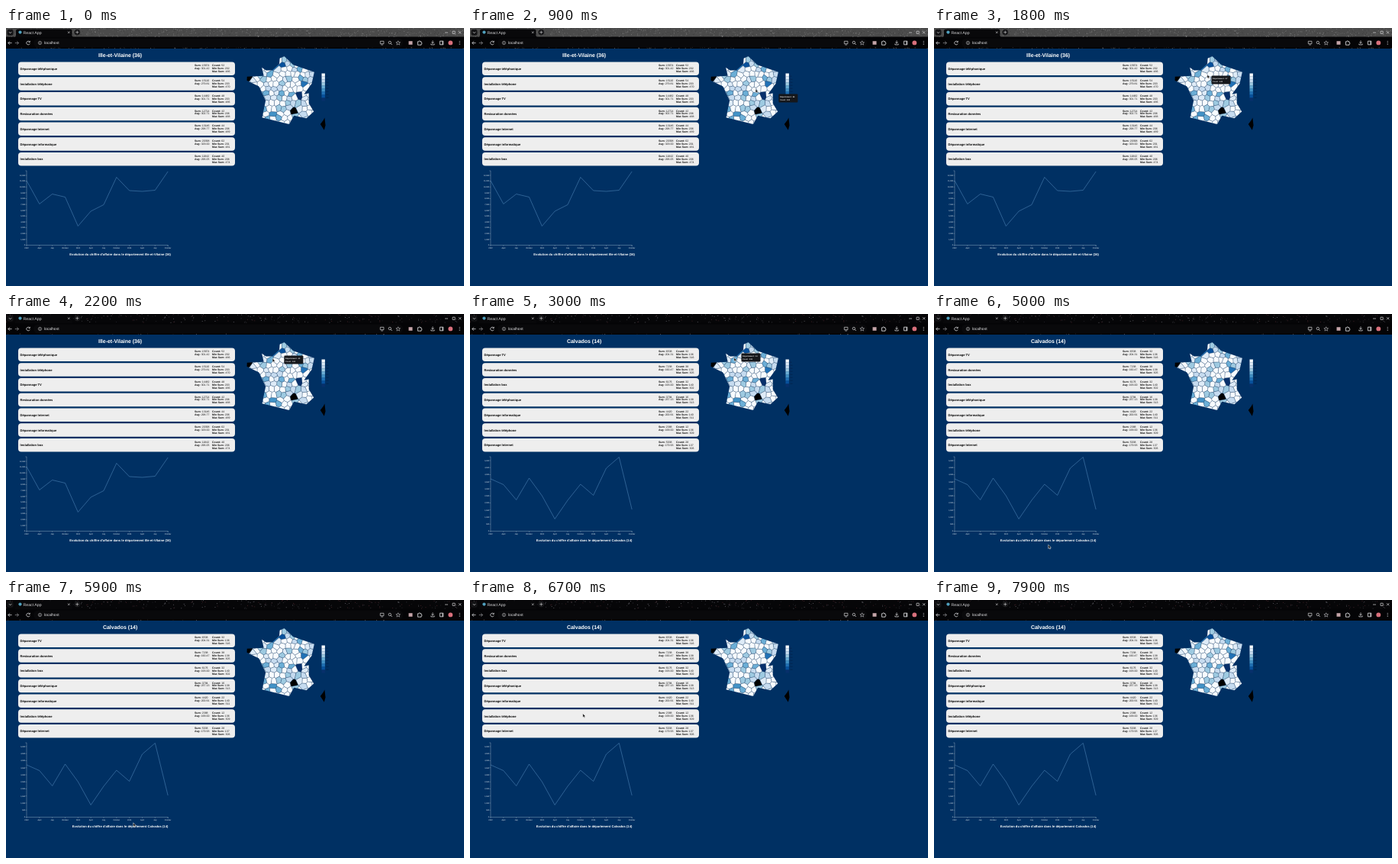
Write an HTML page that moves like this. It is 600 px wide and 338 px high and loops after 8 s.

```html
<!DOCTYPE html>
<html lang="fr">
<head>
<meta charset="utf-8">
<title>Dashboard</title>
<style>
html, body { margin: 0; width: 100%; height: 100%; overflow: hidden; background: #003063; }
svg { display: block; width: 100vw; height: 100vh; }
text { font-family: "Liberation Sans", Arial, sans-serif; text-rendering: geometricPrecision; white-space: pre; }
</style>
</head>
<body>
<svg id="stage" viewBox="0 0 600 338"></svg>
<script>
const LOOP = 8000;
const stage = document.getElementById('stage');

function el(tag, attrs, parent = stage, text) {
  const node = document.createElementNS('http://www.w3.org/2000/svg', tag);
  for (const k in attrs) node.setAttribute(k, attrs[k]);
  if (text !== undefined) node.textContent = text;
  parent.appendChild(node);
  return node;
}
const group = (parent = stage) => el('g', {}, parent);
const rect = (x, y, width, height, fill, rx = 0, parent = stage) =>
  el('rect', { x, y, width, height, fill, rx }, parent);
const circle = (cx, cy, r, fill, extra = {}) => el('circle', { cx, cy, r, fill, ...extra });
const line = (d, stroke, width, parent = stage) =>
  el('path', { d, stroke, 'stroke-width': width, fill: 'none' }, parent);
const label = (x, y, size, fill, text, parent = stage, extra = {}) =>
  el('text', { x, y, 'font-size': size, fill, ...extra }, parent, text);
const show = (node, on) => node.setAttribute('display', on ? 'inline' : 'none');
const pathOf = pts => 'M' + pts.map(p => p[0].toFixed(2) + ' ' + p[1].toFixed(2)).join('L');

function random(seed) {
  return () => {
    seed = (seed * 1664525 + 1013904223) % 4294967296;
    return seed / 4294967296;
  };
}

// Browser frame
rect(0, 0, 600, 27, '#040406');

function sky(seed, count, base, colors) {
  const rnd = random(seed), g = group();
  rect(0, 0, 600, 11.5, base, 0, g);
  for (const color of colors) {
    let d = '';
    for (let i = 0; i < count; i++) {
      const y = rnd() < 0.93 ? rnd() * 11.5 : 25.5 + rnd() * 1.5;
      d += `M${(rnd() * 600).toFixed(1)} ${y.toFixed(1)}h.8`;
    }
    line(d, color, 0.8, g);
  }
  return g;
}
const greySky = sky(11, 260, '#4b4b4b', ['#5a5a5a', '#3a3a3a', '#666', '#8a8a8a']);
const darkSky = sky(29, 75, '#060608', ['#2b2b32', '#44444c', '#5a2c34', '#77777e']);

function drawBrowser() {
  const ink = '#d4d4d6';
  rect(1.5, 1.8, 8, 8, '#141416', 2.5);
  line('M4 5.2l1.6 1.6 1.6-1.6', ink, 0.8);
  el('path', { d: 'M11 12q2 0 2-2.5V4q0-2.5 2.5-2.5H84q2.5 0 2.5 2.5v5.5q0 2.5 2 2.5', fill: '#08080a' });
  circle(18.5, 5.6, 2.1, '#4f9fbd');
  label(22.6, 7.5, 5.2, ink, 'React App');
  line('M81 4.4l2.6 2.6m0-2.6l-2.6 2.6', ink, 0.6);
  circle(93.3, 5.6, 3.8, '#18181a');
  line('M91.3 5.6h4m-2-2v4', ink, 0.6);
  line('M575 6h4M585 4.2h3.2v3.2H585zM593 4.2l3.2 3.2m0-3.2L593 7.4', ink, 0.7);

  rect(36, 13.4, 484, 12.2, '#09090b', 6);
  line('M7.6 19.6H3m2-2.2l-2.2 2.2 2.2 2.2', ink, 0.8);
  line('M11.8 19.6h4.6m-2-2.2l2.2 2.2-2.2 2.2', '#88888c', 0.8);
  line('M31 18.3a2.3 2.3 0 1 0 .2 2.2M31.3 16.8v1.8h-1.8', ink, 0.8);
  circle(44.5, 19.5, 2.1, 'none', { stroke: ink, 'stroke-width': 0.6 });
  line('M44.5 19.2v1.4M44.5 18.2v.5', ink, 0.6);
  label(49.8, 21.3, 5, '#e4e4e6', 'localhost');

  line('M490.3 17.3h4.6v3.4h-4.6zM491.3 22h2.6', ink, 0.7);
  circle(502.8, 19, 1.7, 'none', { stroke: ink, 'stroke-width': 0.7 });
  line('M504 20.2l1.8 1.8', ink, 0.8);
  line('M513.7 16.8l.8 1.9 2 .1-1.6 1.3.6 2-1.8-1.1-1.8 1.1.6-2-1.6-1.3 2-.1z', ink, 0.55);
  rect(527.5, 17.2, 5, 4.6, '#c4a4a8');
  line('M539.4 17.8h1.4a.9.9 0 0 1 1.8 0h1.4v1.4a.9.9 0 0 1 0 1.8v1.2h-4.6z', ink, 0.9);
  line('M559 16.5v3.6m-1.6-1.5l1.6 1.6 1.6-1.6M556.8 20.6v1.3h4.4v-1.3', ink, 0.8);
  line('M568.4 17.2h4.4v4.6h-4.4zM571.8 17.2v4.6', ink, 0.9);
  circle(582.3, 19.4, 2.9, '#d9707c');
  for (const y of [17.5, 19.5, 21.5]) circle(594.2, y, 0.6, ink);
}
drawBrowser();

// Choropleth: conic conformal projection with both parallels at 30 degrees
function project([lon, lat]) {
  const rad = Math.PI / 180;
  const r = Math.sqrt(Math.tan((90 - lat) / 2 * rad)), a = lon / 2 * rad;
  return [348 + 1277 * r * Math.sin(a), 37 + 1277 * (r * Math.cos(a) - 0.59412)];
}
const coast = [
  [2.5, 51.1], [4.2, 50], [8.2, 48.95], [7.55, 47.5], [6, 46.2], [6.9, 46.3], [6.8, 45], [7.6, 43.9],
  [6.2, 43.1], [4, 43.5], [3.1, 42.4], [-1.7, 43.3], [-1.1, 45.5], [-2.4, 47.3], [-4.7, 48], [-4.7, 48.5],
  [-1.5, 48.65], [-1.9, 49.7], [-1.1, 49.35], [.1, 49.35], [1.5, 50.15], [1.6, 50.85]
];
const corsica = [[9.45, 43], [9.5, 42], [9.2, 41.4], [8.6, 42.2], [9.2, 42.7]];
const blues = ['#f7fbff', '#deebf7', '#c6dbef', '#9ecae1', '#6baed6', '#4292c6', '#2171b5', '#08519c', '#08306b'];
// Standout departments: x, y, fill
const marked = [
  [318.5, 65, '#000'], [376.5, 109, '#000'], [385, 88, blues[8]], [363, 48, blues[7]], [352.5, 50, blues[6]],
  [390, 73, blues[6]], [341, 85, blues[4]], [373, 87, blues[4]], [350, 113, blues[5]]
];

function sites() {
  const rnd = random(7), list = marked.slice();
  const spread = () => (rnd() - 0.5) * 3.6;
  for (let row = 0; row < 16; row++) {
    for (let col = 0; col < 14; col++) {
      const x = 312 + (col + (row % 2) / 2) * 7 + spread(), y = 35 + row * 6.4 + spread();
      const fill = blues[Math.floor(5 * rnd() ** 2)];
      if (marked.every(m => Math.hypot(m[0] - x, m[1] - y) > 5)) list.push([x, y, fill]);
    }
  }
  return list;
}

// Keeps the part of a polygon nearer to a than to b
function nearer(poly, a, b) {
  const side = p => (p[0] - (a[0] + b[0]) / 2) * (b[0] - a[0]) + (p[1] - (a[1] + b[1]) / 2) * (b[1] - a[1]);
  const out = [];
  poly.forEach((p, i) => {
    const q = poly[(i + 1) % poly.length], s = side(p), e = side(q);
    if (s <= 0) out.push(p);
    if (s * e < 0) out.push([p[0] + (q[0] - p[0]) * s / (s - e), p[1] + (q[1] - p[1]) * s / (s - e)]);
  });
  return out;
}

function drawMap() {
  const border = { stroke: '#1c3a60', 'stroke-width': 0.28, 'stroke-linejoin': 'round' };
  const shape = pathOf(coast.map(project)) + 'Z';
  el('path', { d: shape }, el('clipPath', { id: 'land' }));
  const land = el('g', { 'clip-path': 'url(#land)' });
  const all = sites();
  for (const a of all) {
    let cell = [[305, 30], [410, 30], [410, 135], [305, 135]];
    for (const b of all) if (a !== b) cell = nearer(cell, a, b);
    if (cell.length) el('path', { d: pathOf(cell) + 'Z', fill: a[2], ...border }, land);
  }
  el('path', { d: pathOf(corsica.map(project)) + 'Z', fill: '#000' });
  blues.forEach((c, i) => {
    rect(413.5, 59.5 + i * 4, 4.4, 4.1, c);
    if (i) label(419.5, 60.3 + i * 4, 2, '#001a3a', i * 50);
  });
}
drawMap();

// Dashboard pages: rows hold name, sum and count; curves are heights on the stage
const TV = 'Dépannage TV', NET = 'Dépannage Internet', PC = 'Dépannage informatique';
const TEL = 'Dépannage téléphonique', LINE = 'Installation téléphone';
const BOX = 'Installation box', DATA = 'Restauration données';
const pages = [
  {
    name: 'Ille-et-Vilaine', code: 36, step: 1000, ticks: 12, top: 193, low: 200, high: 470,
    rows: [[TEL, 15674, 52], [LINE, 15110, 54], [TV, 14482, 48], [DATA, 12714, 42],
      [NET, 13146, 44], [PC, 20398, 62], [BOX, 11842, 40]],
    curve: [200, 230.5, 217.5, 221.5, 259.5, 240, 231.5, 195.5, 213, 214, 212.5, 188]
  },
  {
    name: 'Calvados', code: 14, step: 500, ticks: 10, top: 192, low: 135, high: 300,
    rows: [[TV, 6538, 32], [DATA, 7238, 38], [BOX, 6176, 32], [TEL, 3794, 16],
      [PC, 4420, 22], [LINE, 2388, 12], [NET, 5038, 28]],
    curve: [216, 223.5, 243.5, 215, 238, 268.5, 244, 223, 237.5, 202, 187.5, 256]
  },
  {
    name: 'Maine-et-Loire', code: 50, step: 1000, ticks: 10, top: 191, low: 201, high: 465,
    rows: [[BOX, 7922, 26], [TV, 14546, 54], [TEL, 13826, 50], [DATA, 7252, 28],
      [LINE, 11824, 38], [PC, 15178, 48], [NET, 8166, 28]],
    curve: [219, 217.5, 243.5, 229, 208.5, 269.5, 221, 213, 216.5, 233.5, 187.5, 220]
  }
];

function stat(x, y, name, value, parent) {
  const t = label(x, y, 3.5, '#111', undefined, parent);
  el('tspan', { 'font-weight': 'bold' }, t, name + ': ');
  el('tspan', {}, t, value);
}

function drawCard([name, sum, count], i, page, rnd, parent) {
  const y = 44.4 + i * 19.75;
  rect(16, y, 284, 17.7, '#eeeeee', 4, parent);
  label(18.5, y + 10.5, 4.08, '#000', name, parent, { 'font-weight': 'bold' });
  stat(247, y + 5.9, 'Sum', sum, parent);
  stat(247, y + 9.8, 'Avg', (sum / count).toFixed(2), parent);
  stat(270, y + 5.9, 'Count', count, parent);
  stat(270, y + 9.8, 'Min Sum', page.low + Math.floor(rnd() * 8), parent);
  stat(270, y + 13.7, 'Max Sum', page.high + Math.floor(rnd() * 30), parent);
}

function drawChart({ curve, step, ticks, top }, parent) {
  const ink = '#c5d1e0', base = 284.5, x = i => 27 + i * 16.83;
  line(`M25.5 187H27V${base}H212.2v1.5`, ink, 0.35, parent);
  for (let i = 0; i <= ticks; i++) {
    const y = base + (top - base) * i / ticks;
    line(`M25.5 ${y}H27`, ink, 0.3, parent);
    label(25.2, y + 0.85, 2.4, '#fff', (i * step).toLocaleString('en-US'), parent, { 'text-anchor': 'end' });
  }
  curve.forEach((_, i) => {
    const name = ['', 'April', 'July', 'October'][i % 4] || 2022 + i / 4;
    line(`M${x(i)} ${base}v1.5`, ink, 0.3, parent);
    label(x(i), 288.7, 2.4, '#fff', name, parent, { 'text-anchor': 'middle' });
  });
  line(pathOf(curve.map((y, i) => [x(i), y])), '#5c93c4', 0.5, parent);
}

function drawPage(page) {
  const g = group(), heading = { 'font-weight': 'bold', 'text-anchor': 'middle' };
  const title = `${page.name} (${page.code})`, rnd = random(page.code);
  label(149.6, 38, 6.98, '#fff', title, g, heading);
  page.rows.forEach((row, i) => drawCard(row, i, page, rnd, g));
  drawChart(page, g);
  label(149.6, 297.6, 4.15, '#fff', "Evolution du chiffre d'affaire dans le département " + title, g, heading);
  return g;
}
const views = pages.map(drawPage);

// Tooltip and pointer
const tip = group();
rect(0, 0, 25, 11, '#15171b', 1, tip);
const tipCode = label(1.6, 4.4, 2.4, '#eee', '', tip, { 'font-weight': 'bold' });
const tipCount = label(1.6, 8.2, 2.4, '#ddd', '', tip, { 'font-weight': 'bold' });
const pointer = el('path', {
  d: 'M0 0V5L1.2 4 2 5.7 2.9 5.3 2.1 3.7H3.7Z',
  fill: '#111', stroke: '#fff', 'stroke-width': 0.5, 'stroke-linejoin': 'round'
});

// Pointer stops: time, x, y
const route = [
  [100, 405, 98], [1500, 354, 68], [1800, 358, 61], [2400, 346, 57], [3000, 346, 57], [3500, 338, 56],
  [4000, 346, 57], [4500, 347, 58], [4700, 384, 78], [5000, 149.7, 302.3], [5600, 84, 291],
  [6000, 182, 292], [6700, 147.8, 148.8], [7200, 296, 98], [7400, 430, 75], [7600, 570, 195]
];

function along(t) {
  const i = Math.max(1, route.findIndex(k => k[0] >= t));
  const a = route[i - 1], b = route[i], u = (t - a[0]) / (b[0] - a[0]);
  const s = u * u * (3 - 2 * u);
  return [a[1] + (b[1] - a[1]) * s, a[2] + (b[2] - a[2]) * s];
}

function pageAt(t) {
  if (t < 2500) return 0;
  return t >= 3300 && t < 4000 ? 2 : 1;
}

// The tooltip stays where the pointer entered a department
function placeTip(t, page) {
  const [x, y] = along(Math.floor(t / 500) * 500);
  tip.setAttribute('transform', `translate(${x + 9.5} ${y - 5.5})`);
  tipCode.textContent = 'Département : ' + (page.code === 36 ? 10 + Math.round(x * y) % 85 : page.code);
  tipCount.textContent = 'Count : ' + page.rows.reduce((n, row) => n + row[2], 0);
}

function render(time) {
  const t = Math.floor(time / 100) * 100;
  show(greySky, t < 2000);
  show(darkSky, t >= 2000);
  const page = pageAt(t);
  views.forEach((v, i) => show(v, i === page));

  const hovering = t >= 500 && t < 4800;
  show(tip, hovering);
  if (hovering) placeTip(t, pages[page]);

  const moving = t >= 100 && t < 7600;
  show(pointer, moving);
  if (moving) pointer.setAttribute('transform', `translate(${along(t)})`);
}

function loop() {
  render(performance.now() % LOOP);
  requestAnimationFrame(loop);
}
loop();
</script>
</body>
</html>
```
